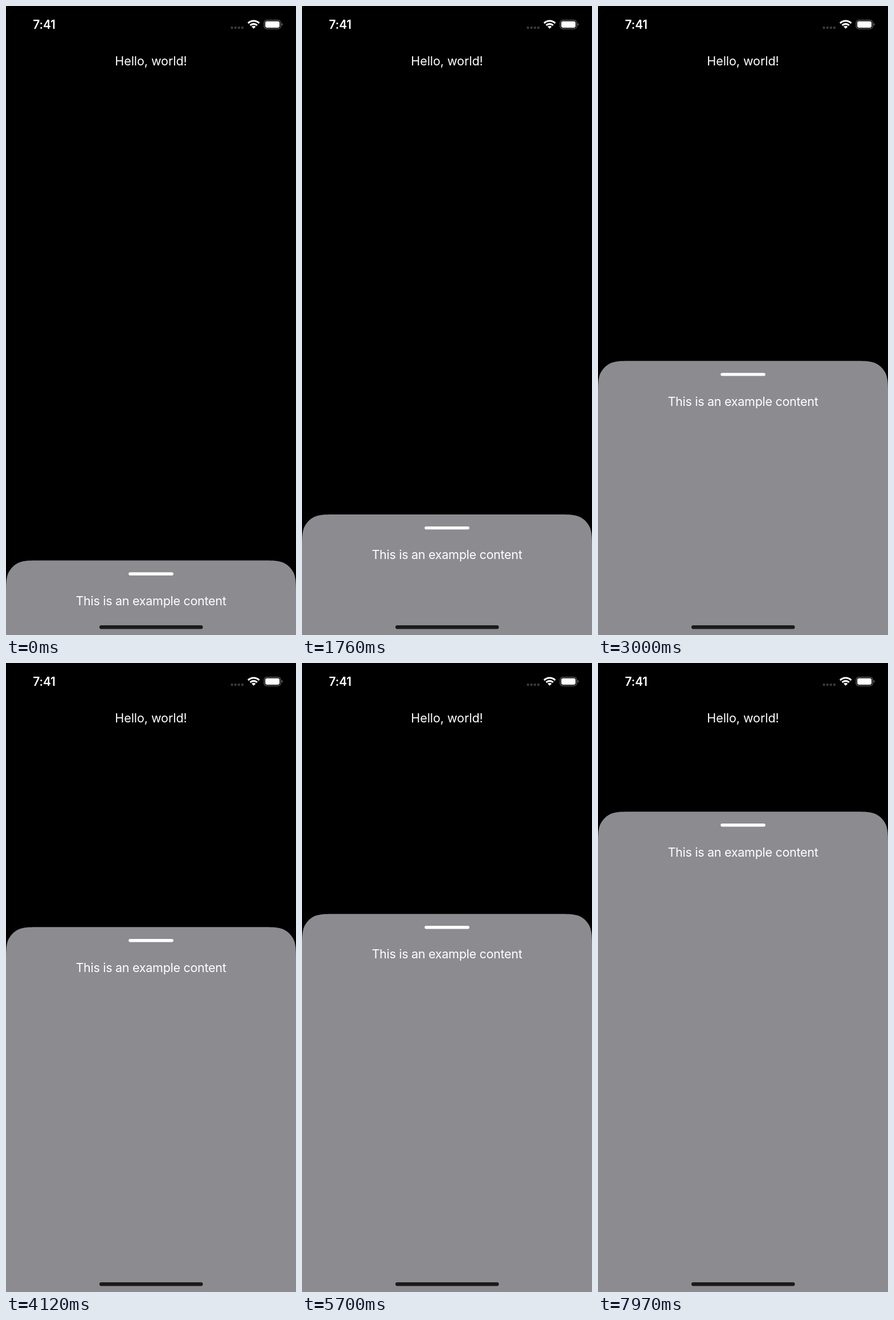
Write an HTML page that moves like this. It is 509 px wide and 1101 px high and loops after 8 s.

```html
<!DOCTYPE html>
<html lang="en">
<head>
<meta charset="utf-8">
<title>Bottom sheet</title>
<style>
  html, body { margin: 0; width: 100%; height: 100%; overflow: hidden; background: #000; }
  svg { display: block; width: 100%; height: 100%; }
  text { font-family: Inter, Roboto, sans-serif; font-size: 21.5px; fill: #fff; }
  .centred { text-anchor: middle; }
  #clock { font-size: 21px; font-weight: 600; letter-spacing: -.2px; }
  #greeting { letter-spacing: -.05px; }
  #content { letter-spacing: -.28px; }
</style>
</head>
<body>
<svg viewBox="0 0 509 1101">
  <rect width="509" height="1101"/>

  <text id="clock" x="47.3" y="40">7:41</text>
  <g id="signal" fill="#3b3b3b"></g>
  <g id="wifi" fill="none" stroke="#fff" stroke-width="3.2"></g>
  <g id="battery">
    <rect x="453.2" y="24.8" width="28.8" height="15" rx="4.4" fill="none" stroke="#6b6b6b" stroke-width="1.3"/>
    <rect x="455.1" y="26.7" width="25" height="11.2" rx="2.8" fill="#fff"/>
    <path d="M483.6 29.8q1.9.8 1.9 2.5t-1.9 2.5z" fill="#6b6b6b"/>
  </g>

  <text id="greeting" class="centred" x="254.5" y="103.5">Hello, world!</text>

  <g id="sheet">
    <path id="panel" fill="#8c8b90"/>
    <rect x="215.2" y="20.8" width="78.6" height="5.4" rx="2.7" fill="#fff"/>
    <text id="content" class="centred" x="254.5" y="78.3">This is an example content</text>
  </g>

  <rect x="164" y="1084" width="181.5" height="6.6" rx="3.3" fill="#1a1a1a"/>
</svg>
<script>
  const LOOP = 8000, WIDTH = 509, HEIGHT = 1101, RADIUS = 39.15;
  const LOW = 970.5, MID = 555.2, HIGH = 140;
  const $ = id => document.getElementById(id);

  // Each gesture: drag from one rest to a release point, then snap to a rest.
  const SNAP = 350;
  const gestures = [
    { start: 1060, release: 1555, from: LOW, drag: 741, to: LOW },
    { start: 2690, release: 3020, from: LOW, drag: 618, to: MID },
    { start: 3925, release: 4350, from: MID, drag: 345, to: MID },
    { start: 5475, release: 5980, from: MID, drag: 280, to: HIGH },
    { start: 7745, release: 8175, from: HIGH, drag: 363.5, to: HIGH }
  ];

  const clamp = v => Math.min(1, Math.max(0, v));
  const mix = (a, b, k) => a + (b - a) * k;
  const smooth = u => u * u * (3 - 2 * u);

  // cubic-bezier(.42, 0, .58, 1), solved by bisection
  function easeInOut(x) {
    let lo = 0, hi = 1;
    for (let i = 0; i < 24; i++) {
      const s = (lo + hi) / 2, r = 1 - s;
      if (1.26 * s * r * r + 1.74 * s * s * r + s * s * s < x) lo = s; else hi = s;
    }
    return smooth((lo + hi) / 2);
  }

  function sheetTop(t) {
    let top = LOW;
    for (const g of gestures) {
      if (t < g.start) break;
      top = t < g.release
        ? mix(g.from, g.drag, smooth((t - g.start) / (g.release - g.start)))
        : mix(g.drag, g.to, easeInOut(clamp((t - g.release) / SNAP)));
    }
    return top;
  }

  // Continuous corners: the curvature fades in along both edges.
  function panelPath() {
    const corner = [
      [0, 1.5287], [0, 1.0885], [0, .8684], [.0749, .6315],
      [.1691, .3728], [.3728, .1691], [.6315, .0749],
      [.8684, 0], [1.0885, 0], [1.5287, 0]
    ].map(p => p.map(v => v * RADIUS));
    const mirrored = corner.map(([x, y]) => [WIDTH - x, y]).reverse();
    const curve = pts => `${pts[0]}C${pts.slice(1).join(' ')}`;
    return `M0 ${HEIGHT}L${curve(corner)}L${curve(mirrored)}V${HEIGHT}Z`;
  }

  function wifiArc(r) {
    const d = r * Math.SQRT1_2;
    return `M${434.7 - d} ${39.8 - d}A${r} ${r} 0 0 1 ${434.7 + d} ${39.8 - d}`;
  }

  $('panel').setAttribute('d', panelPath());
  $('signal').innerHTML = [0, 1, 2, 3]
    .map(i => `<circle cx="${396.6 + 6.1 * i}" cy="38" r="2.2"/>`).join('');
  $('wifi').innerHTML = [13.8, 8.5]
    .map(r => `<path d="${wifiArc(r)}"/>`).join('') +
    `<path d="${wifiArc(5)}L434.7 39.8Z" fill="#fff" stroke="none"/>`;

  function render(t) {
    $('sheet').setAttribute('transform', `translate(0 ${sheetTop(t).toFixed(2)})`);
  }

  const begin = performance.now();
  function frame() {
    render((performance.now() - begin) % LOOP);
    requestAnimationFrame(frame);
  }
  render(0);
  requestAnimationFrame(frame);
</script>
</body>
</html>
```
